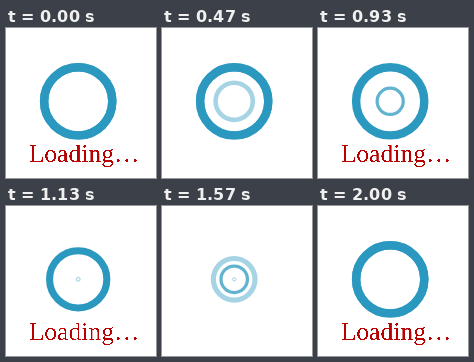
An HTML page that plays this animation: 150 px wide and 150 px high, repeating every 2030 ms.

```html
<!DOCTYPE html>
<html lang="en">
<head>
<meta charset="utf-8">
<title>Loading</title>
<style>
  html, body { margin: 0; width: 100%; height: 100%; overflow: hidden; background: #fff; }
  svg { display: block; width: 150px; height: 150px; }
  circle { fill: none; stroke: #2b98c0; stroke-width: 8.4; }
  text { font: 25.6px "Liberation Serif", "Times New Roman", serif; fill: #b80000; }
</style>
</head>
<body>
<svg viewBox="0 0 150 150">
  <!-- hard edges: the lettering thins out as it fades -->
  <filter id="crisp" color-interpolation-filters="sRGB">
    <feComponentTransfer><feFuncA type="linear" slope="12" intercept="-5.5"/></feComponentTransfer>
  </filter>
  <circle r="34.1" opacity=".42"/>
  <circle r="34.1" opacity=".74"/>
  <circle r="34.1"/>
  <g filter="url(#crisp)"><text x="22.7" y="134.4">Loading…</text></g>
</svg>
<script>
const CYCLE = 2000, REST = 30;
const rings = document.querySelectorAll('circle');
const label = document.querySelector('text');

const wave = p => (1 + Math.cos(2 * Math.PI * p)) / 2;

function draw(now) {
  const t = Math.min(now % (CYCLE + REST), CYCLE);
  // each ring sets off 500 ms after the last; all shrink, regrow and meet at the end
  rings.forEach((ring, i) => {
    const delay = i * 500;
    const scale = wave(Math.max(0, t - delay) / (CYCLE - delay));
    ring.setAttribute('transform', `translate(72.2 73.3) scale(${scale})`);
  });
  label.setAttribute('opacity', wave(t / 1000));
}

const start = performance.now();
function tick() {
  draw(performance.now() - start);
  requestAnimationFrame(tick);
}
tick();
</script>
</body>
</html>
```
